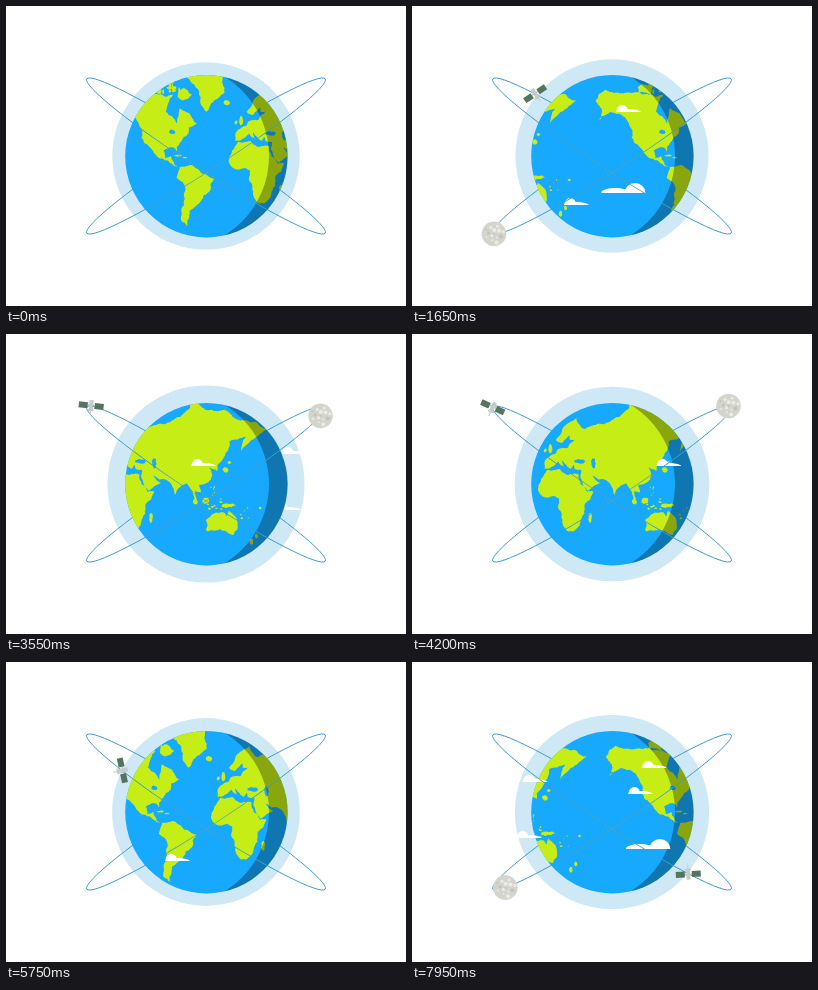
Recreate the animation shown at these times as an HTML page with a canvas. Size 400 by 300 pixels, loop 8 s.

```html
<!DOCTYPE html>
<html lang="en">
<head>
<meta charset="utf-8">
<title>Rotating Earth</title>
<style>
html, body { margin: 0; width: 100%; height: 100%; overflow: hidden; background: #fff; }
canvas { display: block; width: 400px; height: 300px; }
</style>
</head>
<body>
<canvas id="stage" width="400" height="300"></canvas>
<script>
const ctx = document.getElementById('stage').getContext('2d');
const LOOP = 8000, STEP = 50, CYCLE = 6000, TAU = Math.PI * 2, RAD = Math.PI / 180;
const GLOBE = { x: 200.4, y: 150.2, r: 81.2 };
const ORBIT = { a: 142, b: 14.3, tilt: 32.9 * RAD };
const MAP = { pxPerRad: 46.8, equator: 167.5, width: 311, start: 236.6, speed: 0.051 };
const OCEAN = '#16a9fd', LAND = '#c6ee16', LINE = '#3c9cca';

const mod = (n, m) => ((n % m) + m) % m;

let seed = 7;
function random() {
  seed = (seed * 16807) % 2147483647;
  return seed / 2147483647;
}

// Key points of the coasts as longitude, latitude; roughen() adds the detail.
const coasts = {
  northAmerica: [-168,66, -156,71, -128,70, -95,68, -85,69, -94,60, -80,52, -77,62, -65,59, -56,52, -66,49, -66,44,
    -76,36, -81,26, -84,30, -97,27, -95,18, -88,21, -83,10, -79,8, -95,16, -106,22, -114,31, -124,40, -124,48,
    -136,58, -150,60, -164,54, -160,60],
  southAmerica: [-77,8, -62,10, -50,0, -35,-6, -39,-18, -48,-26, -57,-37, -65,-42, -68,-54, -75,-50, -71,-30,
    -70,-18, -81,-5],
  greenland: [-70,78, -54,71, -51,64, -44,60, -38,65, -22,70, -18,80],
  africa: [-6,36, 10,37, 20,31, 33,31, 43,12, 51,12, 40,-4, 40,-15, 35,-25, 27,-34, 19,-34, 12,-17, 9,4, -8,5,
    -17,14, -13,27],
  eurasia: [-9,43, -9,37, 0,39, 8,44, 16,38, 13,45, 23,37, 27,41, 28,37, 36,36, 35,28, 44,13, 59,22, 50,30, 57,26,
    67,25, 73,18, 77,8, 80,15, 91,22, 95,16, 99,8, 103,1, 101,13, 108,11, 106,20, 117,23, 122,30, 118,39, 128,35,
    128,40, 140,52, 143,59, 163,62, 157,51, 170,60, 190,66, 160,70, 113,74, 100,77, 68,69, 40,66, 30,71, 13,66,
    5,60, 12,58, 18,61, 24,65, 22,60, 28,60, 20,55, 8,54, -3,48],
  australia: [114,-22, 130,-14, 136,-13, 140,-18, 142,-11, 153,-26, 148,-38, 138,-34, 131,-32, 115,-34]
};
// Longitude, latitude, width and height in degrees.
const islands = [
  [-72, 69, 17, 6], [-110, 71, 14, 4], [-79, 21.5, 10, 2], [-71, 19, 6, 2], [-19, 65, 9, 3], [-2, 54, 5, 7],
  [-8, 53, 4, 3], [47, -19, 5, 13], [114, 1, 9, 9], [101, 0, 6, 7], [141, -5, 17, 6], [138, 36, 7, 5],
  [143, 43, 4, 3], [176, -39, 4, 5], [170, -44, 4, 5]];
const seas = [[34, 44, 13, 4], [51, 42, 6, 9], [-86, 45, 8, 4]];
// Centre, spread and number of scattered small islands.
const archipelagos = [
  { lon: -97, lat: 73, w: 50, h: 6, count: 12 }, { lon: 122, lat: -3, w: 26, h: 13, count: 12 },
  { lon: 123, lat: 12, w: 6, h: 12, count: 6 }, { lon: 168, lat: -14, w: 26, h: 18, count: 7 }];

const project = (lon, lat) => ({
  x: lon * RAD * MAP.pxPerRad,
  y: MAP.equator - MAP.pxPerRad * Math.log(Math.tan(Math.PI / 4 + lat * RAD / 2))
});

// Midpoint displacement from p to q.
function roughen(path, p, q) {
  const dx = q.x - p.x, dy = q.y - p.y;
  if (Math.hypot(dx, dy) < 2.5) return path.lineTo(q.x, q.y);
  const k = (random() - 0.5) * 0.28;
  const mid = { x: (p.x + q.x) / 2 - dy * k, y: (p.y + q.y) / 2 + dx * k };
  roughen(path, p, mid);
  roughen(path, mid, q);
}

function addCoast(path, points) {
  path.moveTo(points[0].x, points[0].y);
  points.forEach((p, i) => roughen(path, p, points[(i + 1) % points.length]));
  path.closePath();
}

function addBlob(path, [lon, lat, w, h]) {
  const points = [];
  for (let a = 0; a < TAU; a += TAU / 7) {
    const r = 0.5 + (random() - 0.5) * 0.2;
    points.push(project(lon + w * r * Math.cos(a), lat + h * r * Math.sin(a)));
  }
  addCoast(path, points);
}

const landPath = new Path2D(), seaPath = new Path2D();
for (const list of Object.values(coasts)) {
  const points = [];
  for (let i = 0; i < list.length; i += 2) points.push(project(list[i], list[i + 1]));
  addCoast(landPath, points);
}
islands.forEach(island => addBlob(landPath, island));
seas.forEach(sea => addBlob(seaPath, sea));
for (const { lon, lat, w, h, count } of archipelagos) {
  for (let i = 0; i < count; i++) {
    addBlob(landPath, [lon + (random() - 0.5) * w, lat + (random() - 0.5) * h, 1 + random() * w / 9, 1 + random() * 2]);
  }
}

function disc(x, y, r, color) {
  ctx.fillStyle = color;
  ctx.beginPath();
  ctx.arc(x, y, r, 0, TAU);
  ctx.fill();
}

function clipGlobe() {
  ctx.beginPath();
  ctx.arc(GLOBE.x, GLOBE.y, GLOBE.r, 0, TAU);
  ctx.clip();
}

// Each cloud drifts right in front of the globe from time `turn`, then returns behind it.
const clouds = [
  { y: 106, turn: 600, period: CYCLE, left: 120, speed: 0.086 },
  { y: 187, turn: 650, period: CYCLE, left: 140, speed: 0.083, big: true },
  { y: 120, turn: 400, period: CYCLE, left: -80, speed: 0.127 },
  { y: 176, turn: 400, period: CYCLE, left: -86, speed: 0.127 },
  { y: 132, turn: 2600, period: 4060, left: 105, speed: 0.091, from: 600 },
  { y: 199, turn: 980, period: 4020, left: 99, speed: 0.0884 }
];

function drawCloud(x, y, big) {
  const mound = (cx, rx, ry) => {
    ctx.beginPath();
    ctx.ellipse(x + cx, y, rx, ry, 0, Math.PI, TAU);
    ctx.fill();
  };
  ctx.fillStyle = '#fff';
  if (big) {
    mound(0, 10.5, 10);
    mound(-20, 14, 5);
    mound(-10, 10, 4);
  } else {
    mound(0, 6, 7);
    mound(6, 12.5, 3);
  }
}

function drawClouds(t, front) {
  for (const { y, turn, period, left, speed, big, from = 0 } of clouds) {
    const p = mod(t - turn, period), goingRight = p < period / 2;
    if (t >= from && goingRight === front) drawCloud(left + speed * Math.min(p, period - p), y, big);
  }
}

// The lines lose their blue towards the middle of the globe.
const lineColor = ctx.createRadialGradient(200, 150, 15, 200, 150, 65);
lineColor.addColorStop(0, 'rgba(95,160,165,.75)');
lineColor.addColorStop(1, LINE);

function drawOrbits(end) {
  ctx.strokeStyle = lineColor;
  ctx.lineWidth = 1;
  for (const side of [-1, 1]) {
    ctx.beginPath();
    ctx.ellipse(200, 150, ORBIT.a, ORBIT.b, side * ORBIT.tilt, 0, end);
    ctx.stroke();
  }
}

// side -1 rises to the right, side 1 falls to the right.
function orbitPoint(degrees, side) {
  const u = ORBIT.a * Math.cos(degrees * RAD), v = ORBIT.b * Math.sin(degrees * RAD);
  const c = Math.cos(ORBIT.tilt), s = side * Math.sin(ORBIT.tilt);
  return { x: 200 + u * c + v * s, y: 150 + u * s - v * c, front: mod(degrees, 360) >= 180 };
}

// Slow half turn behind the globe, quick eased one in front of it.
function moonAngle(t) {
  const back = 3600, p = mod(t - 3930, CYCLE);
  if (p < back) return 180 * (p / back) ** 1.15;
  const q = (p - back) / (CYCLE - back);
  return 180 + 90 * (q + q * q * (3 - 2 * q));
}

// Constant acceleration along the orbit.
function satelliteAngle(t) {
  const s = t / 1000;
  return 118 + 5.5 * s + 2.4 * s * s;
}

function drawMoon(x, y) {
  disc(x, y, 12.3, '#d3d4cc');
  for (let i = 0; i < 14; i++) {
    const a = i * 2.4, d = 2.7 * Math.sqrt(i);
    disc(x + d * Math.cos(a), y + d * Math.sin(a), 1 + (i % 3) * 0.5, i % 4 ? '#ecece7' : '#c2c4bb');
  }
}

function drawSatellite(x, y, spin) {
  ctx.save();
  ctx.translate(x, y);
  ctx.rotate(spin * RAD);
  ctx.fillStyle = '#557460';
  ctx.fillRect(-12.5, -3.5, 9, 6);
  ctx.fillRect(3.5, -3.5, 9, 6);
  ctx.fillStyle = '#a9b5b3';
  ctx.fillRect(-3.5, -1.5, 7, 1.2);
  ctx.fillStyle = '#c3cdcb';
  ctx.fillRect(-2, -6, 4, 11);
  ctx.fillRect(-3, 3, 6, 2);
  ctx.fillRect(-0.5, 5, 1, 4);
  ctx.restore();
}

function drawBodies(t, front) {
  const angle = satelliteAngle(t);
  const moon = orbitPoint(moonAngle(t), -1), satellite = orbitPoint(angle, 1);
  if (moon.front === front) drawMoon(moon.x, moon.y);
  if (satellite.front === front) drawSatellite(satellite.x, satellite.y, 1.17 * angle - 190);
}

function drawGlobe(t) {
  ctx.save();
  clipGlobe();
  ctx.fillStyle = OCEAN;
  ctx.fillRect(100, 50, 200, 200);
  const shift = mod(MAP.start + MAP.speed * t, MAP.width);
  for (const copy of [-1, 0, 1]) {
    ctx.save();
    ctx.translate(shift + copy * MAP.width, 0);
    ctx.fillStyle = LAND;
    ctx.fill(landPath);
    ctx.fillStyle = OCEAN;
    ctx.fill(seaPath);
    ctx.restore();
  }
  // Night side: everything right of a larger, offset circle.
  ctx.fillStyle = 'rgba(0,0,0,.3)';
  ctx.beginPath();
  ctx.rect(200, 50, 100, 200);
  ctx.arc(170, 150, 93, 0, TAU);
  ctx.clip('evenodd');
  ctx.fillRect(200, 50, 100, 200);
  ctx.restore();
}

function draw(t) {
  ctx.fillStyle = '#fff';
  ctx.fillRect(0, 0, 400, 300);
  disc(200, 150, 96.3 - 2.6 * Math.cos(TAU * t / 6110), '#cee8f5');
  drawClouds(t, false);
  drawOrbits(TAU);
  drawBodies(t, false);
  drawGlobe(t);
  drawClouds(t, true);
  ctx.save();
  clipGlobe();
  drawOrbits(Math.PI);
  ctx.restore();
  drawBodies(t, true);
}

const begin = performance.now();
function tick() {
  const t = (performance.now() - begin) % LOOP;
  draw(Math.floor(t / STEP) * STEP);
  requestAnimationFrame(tick);
}
tick();
</script>
</body>
</html>
```
